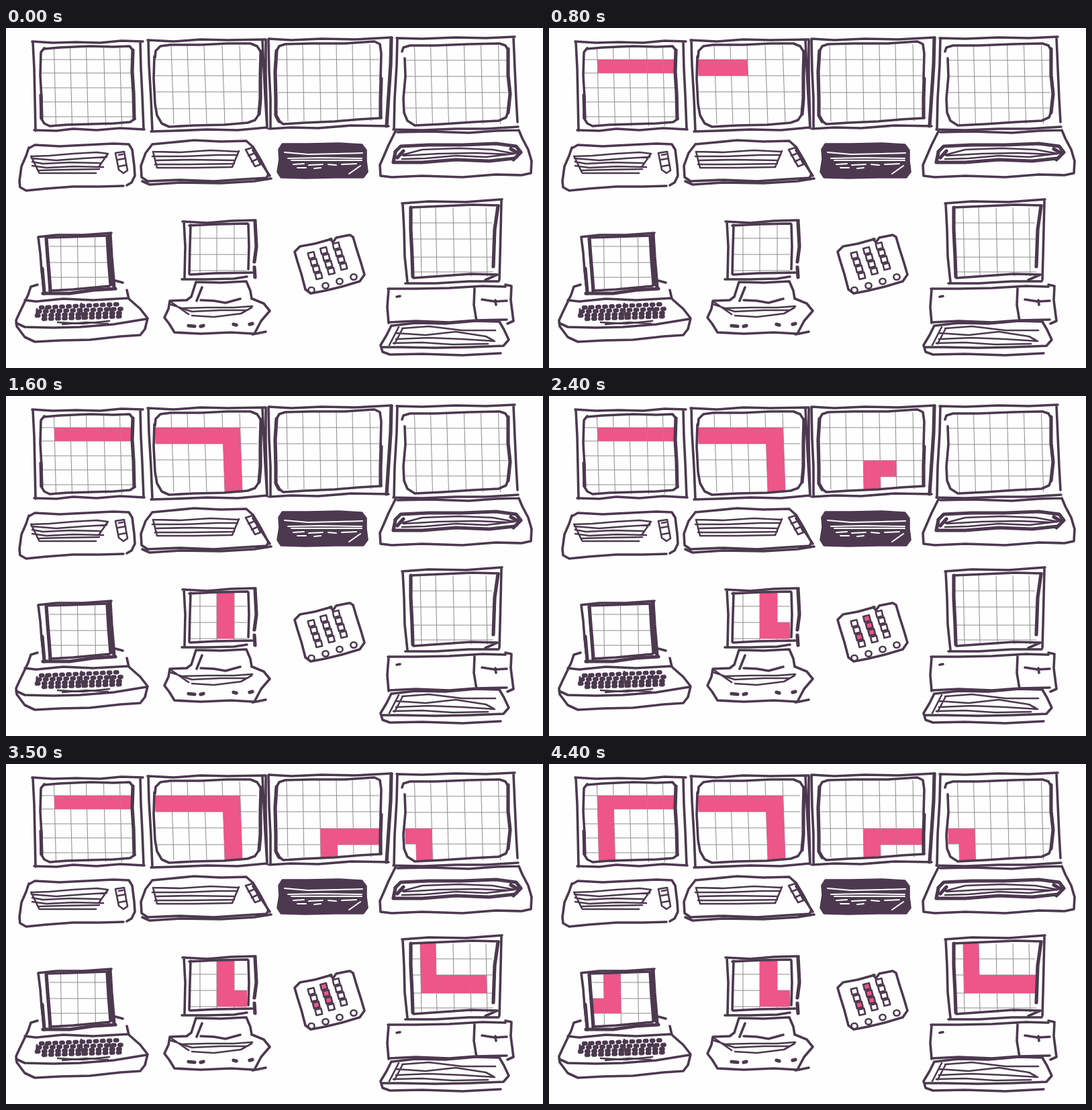
Recreate the animation shown at these times as an HTML page. Size 800 by 506 pixels, loop 4500 ms.

```html
<!DOCTYPE html>
<html lang="en">
<head>
<meta charset="utf-8">
<title>Snake across screens</title>
<style>
html, body { margin: 0; height: 100%; overflow: hidden; background: #fefefe; }
svg { display: block; width: 100vw; height: 100vh; }
#grid { stroke: #8c8c8c; stroke-width: 1; fill: none; }
#snake { fill: #ee5588; }
#ink { fill: none; stroke: #4c394f; stroke-width: 3.6; stroke-linecap: round; stroke-linejoin: round; }
#ink .thin { stroke-width: 2.6; }
#ink .bold { stroke-width: 5.2; }
#ink .keys { stroke-width: 6.4; stroke-dasharray: 2.5 7.6; }
#ink .solid { fill: #4c394f; }
#ink .white { stroke: #fefefe; stroke-width: 2; }
</style>
</head>
<body>
<svg viewBox="0 0 800 506">
<g id="grid"></g>
<g id="snake"></g>
<g id="ink">
  <!-- top row: monitors -->
  <path d="M39 20L70 22 104 21 140 22 172 19 204 20M40 21L42 60 43 105 44 153M42 152L75 153 100 150 135 152 170 149 206 151M200 21L201 60 203 100 205 150"/>
  <path d="M57 31L80 29 125 27 160 28 184 27 189 33M52 37L51 70 53 105 52 134 57 142 65 146 90 144 125 143 160 142 185 140 192 135M57 30L52 36"/>
  <path class="bold" d="M189 33L188 65 190 96 191 135M52 100L53 134"/>
  <path d="M211 18L250 20 290 17 330 18 387 17M212 18L213 55 216 105 218 153M216 154L250 153 300 151 345 152 389 148M382 18L384 60 386 100 389 149M387 18L387 70 389 148"/>
  <path d="M222 44L223 34 230 27 245 25 290 25 330 23 364 23 374 27 380 36M221 42L220 75 222 113 225 130 232 142 243 147 280 145 325 144 360 141 371 137 377 128"/>
  <path class="bold" d="M380 35L379 70 379 105 377 128"/>
  <path d="M391 16L425 18 470 16 520 17 575 14M391 17L392 65 394 105 394 149M392 150L425 148 465 149 515 145 570 146"/>
  <path class="bold" d="M574 15L573 55 570 100 567 146"/>
  <path d="M403 34L407 27 416 24 455 23 505 23 549 20 557 24 559 38 558 75M405 137L413 143 445 141 490 139 525 136 559 134"/>
  <path class="bold" d="M403 34L401 65 402 105 402 130 407 139M559 75L558 105 558 133"/>
  <path d="M582 15L620 16 670 14 715 15 758 13M583 15L582 55 579 105 578 151M577 151L620 152 670 150 715 150 763 147M756 14L758 60 760 105 762 140"/>
  <path d="M590 35L592 29 602 26 640 26 690 24 735 23 744 26 748 33M594 45L595 72 592 105 593 126 598 138 609 145 650 143 695 140 734 138 745 133 748 125"/>
  <path class="bold" d="M748 31L748 70 751 98 748 126"/>

  <!-- top row: keyboards -->
  <path d="M34 179L43 174 80 176 120 174 160 172 183 173 188 181 191 205 192 220 187 230 180 234M175 235L140 236 100 236 60 239 30 242 21 237 20 228 23 206 30 190 34 178"/>
  <path class="thin" d="M37 191L65 190 100 187 135 185 152 187 146 194M38 194L75 197 115 194 150 192M39 199L55 202 95 200 140 201M39 205L60 208 100 206 145 207M48 212L80 211 139 210M50 216L85 216 134 216M38 192L49 215M152 187L138 207"/>
  <path class="thin" d="M163 186L176 184 181 212 175 216 168 211 163 186M167 196L178 194M168 206L179 204M168 189L174 188"/>
  <path d="M218 173L250 170 280 167 320 169 358 168 368 177 380 197 391 218 388 223M218 173L208 186 201 205 202 222 211 228 260 226 310 228 355 225 389 223M203 228L214 233 260 230 320 231 370 228 395 224M368 182L393 220"/>
  <path class="thin" d="M219 184L260 185 305 182 346 184M218 191L265 191 315 189 345 189M222 197L275 196 341 197M222 203L270 203 340 202M226 208L280 208 336 207M219 184L225 208M347 183L337 207"/>
  <path class="thin" d="M357 181L367 178 379 203 371 206 357 181M361 190L371 186M366 199L376 194"/>
  <path class="solid" d="M412 173L450 173 495 172 530 174 536 182 536 198 538 214 532 222 490 222 445 223 410 222 405 214 408 195 407 181Z"/>
  <path class="white" d="M415 185L450 188 495 187 531 186M420 194L470 193 530 194M425 197L530 197M428 203L444 202M451 204L472 203M480 203L492 204M500 203L522 202M434 208L447 208M459 209L469 208M511 217L528 205"/>
  <path d="M580 154L570 174 557 204 558 220 575 222 620 220 680 222 730 218 767 219M764 152L769 164 778 181 783 198 782 216 768 219M583 155L630 154 690 156 730 153 764 152"/>
  <path class="bold" d="M580 184L588 176 630 174 680 174 730 172 760 176 767 185 756 196M580 185L577 200 620 200 670 196 720 198 757 194M583 193L592 183M752 180L764 187"/>
  <path class="thin" d="M590 189L620 181 675 179 725 181 758 187 715 192 670 190 625 194 590 195M592 190L645 187 700 186 748 188"/>

  <!-- bottom row: first computer -->
  <path d="M48 311L75 308 115 308 157 305M48 311L51 335 53 361 57 396"/>
  <path class="bold" d="M60 313L62 340 64 364 66 391M155 307L157 340 161 386M151 310L153 345 156 382M54 358L57 393M55 395L95 395 130 390 163 388"/>
  <path d="M60 312L95 311 152 309M65 391L100 389 154 384"/>
  <path d="M47 382L37 385 33 397 20 424 15 435 16 444 28 460 43 467 80 465 125 464 170 459 200 457 207 448 211 432 200 418 183 403 180 390M163 376L174 379M28 405L45 407 85 403 130 405 183 402M15 439L28 445 70 446 110 445 160 441 209 433"/>
  <path class="keys" d="M52 416L170 411M48 422L173 418M46 428L174 424M56 433L176 429"/>
  <path class="thin" d="M46 418L45 430M60 414L55 434M112 410L114 433M153 410L158 431M77 438L115 440 154 436M84 441L120 438 152 440"/>

  <!-- bottom row: second computer -->
  <path d="M263 288L300 290 335 287 372 286M265 288L267 325 266 372M262 374L300 374 340 373 359 370"/>
  <path class="bold" d="M371 288L373 325 370 348M370 356L371 371"/>
  <path d="M273 294L315 292 360 291M275 293L274 325 273 366M361 292L362 325 361 359M274 367L310 365 367 364"/>
  <path d="M283 378L276 400 269 405M283 378L320 379 358 377 364 391 366 403M292 386L284 406M290 405L310 406 327 409 349 403M270 405L244 406 242 418 236 431 243 440 251 453 290 455 335 453 370 455 380 436 393 421 384 410 367 403M367 456L387 452"/>
  <path class="thin" d="M244 411L262 417 300 416 340 416 367 414M264 418L277 422 320 420 357 420M277 428L310 430 350 425 366 416M246 408L272 426"/>
  <path class="bold" d="M272 443L281 444M290 444L294 443M339 441L343 442M363 441L367 440"/>

  <!-- bottom row: calculator -->
  <path d="M430 333L438 325 460 321 485 314M483 314L487 319 492 312 512 308 517 311 522 328 529 350 534 367 527 377 500 385 475 391 454 395 446 389 440 366 434 347 430 333"/>
  <g id="pad" class="thin"></g>

  <!-- bottom row: third computer -->
  <path d="M590 261L630 258 685 259 739 255M591 261L593 300 594 340 598 378M595 380L640 380 690 377 734 377M738 257L737 300 736 340 735 375"/>
  <path d="M603 267L650 265 695 263 734 264M607 372L650 369 692 366 732 367M714 375L732 367"/>
  <path class="bold" d="M603 267L603 300 605 340 606 370M733 265L728 300 726 355"/>
  <path d="M569 388L610 388 660 387 710 384 744 385M744 382L753 384 752 405 756 436 747 440M570 389L568 415 570 439M571 438L610 436 660 438 700 435 746 434M698 388L697 412 701 436M709 404L728 407 746 406M729 405L730 412M582 400L587 399"/>
  <path d="M574 443L567 457 558 472 561 482 572 486 620 485 680 487 737 484M575 443L610 439 655 440 700 436 735 437 742 449 749 464 741 473 690 475 640 476 590 475 559 475"/>
  <path class="thin" d="M585 445L571 472M590 447L630 444 680 450 729 450M581 454L625 457 670 452 715 459 726 465M581 463L630 461 680 463 728 466M577 469L620 468 665 471 718 470M591 447L579 470"/>
</g>
</svg>
<script>
const STEP = 100, LOOP = 4500;
const byId = id => document.getElementById(id);

function add(parent, tag, attrs) {
  const el = document.createElementNS("http://www.w3.org/2000/svg", tag);
  for (const name in attrs) el.setAttribute(name, attrs[name]);
  return byId(parent).appendChild(el);
}

// Grid edges of each screen; lean is the sideways drift from top to bottom.
const screens = {
  a: { x: [53, 73, 97, 121, 147, 171, 188], y: [29, 47, 67, 89, 110, 132, 146], lean: 3 },
  b: { x: [223, 248, 272, 297, 324, 350, 375], y: [26, 47, 71, 95, 120, 143], lean: 4 },
  c: { x: [405, 419, 443, 468, 493, 517, 543, 557], y: [24, 47, 71, 96, 120, 139], lean: 2 },
  d: { x: [594, 610, 634, 658, 684, 709, 735, 747], y: [26, 48, 72, 96, 119, 143], lean: 3 },
  e: { x: [65, 82, 107, 133, 152], y: [312, 325, 349, 371, 390], lean: 1 },
  f: { x: [275, 289, 314, 340, 359], y: [293, 313, 337, 361, 366], lean: 0 },
  h: { x: [605, 618, 641, 667, 692, 716, 725], y: [267, 290, 314, 341, 363, 370], lean: 2 }
};

function corner(s, col, row) {
  const top = s.y[0], height = s.y.at(-1) - top;
  return (s.x[col] + s.lean * ((s.y[row] - top) / height - 0.5)).toFixed(1) + " " + s.y[row];
}

for (const s of Object.values(screens)) {
  const right = s.x.length - 1, bottom = s.y.length - 1;
  let d = "";
  for (let i = 1; i < right; i++) d += `M${corner(s, i, 0)}L${corner(s, i, bottom)}`;
  for (let j = 1; j < bottom; j++) d += `M${corner(s, 0, j)}L${corner(s, right, j)}`;
  add("grid", "path", { d });
}

// Calculator keys, three tilted columns and a bottom row.
const key = (col, row) => [455 + 18.5 * col + 3.6 * row, 338 - 7 * col + 10.2 * row];
for (let col = 0; col < 3; col++)
  for (let row = 0; row < 4; row++) {
    const [x, y] = key(col, row);
    add("pad", "rect", { x: x - 4.5, y: y - 4, width: 9, height: 8.5, transform: `rotate(-14 ${x} ${y})` });
  }
for (let i = 0; i < 4; i++)
  add("pad", "ellipse", { cx: 455 + 21 * i, cy: 390 - 6.5 * i, rx: 4.6, ry: 4.2 });

// The snake's route: screen letter, then column and row of every cell.
const route = "a 11 21 31 41 51,b 01 11 21 31 41 42 43 44,f 20 21 22 32,g 02 12 11 10," +
  "c 34 33 43 53 63,d 03 13 14,h 10 11 12 22 32 42 52,e 02 12 11 10,a 15 14 13 12";

const cells = route.split(",").flatMap(run => {
  const [name, ...steps] = run.split(" ");
  return steps.map(([c, r]) => {
    const col = +c, row = +r, s = screens[name];
    if (!s) {
      const [cx, cy] = key(col, row);
      return add("snake", "circle", { cx, cy, r: 4.6 });
    }
    const points = [[0, 0], [1, 0], [1, 1], [0, 1]].map(([i, j]) => corner(s, col + i, row + j));
    return add("snake", "polygon", { points: points.join(" ") });
  });
});

const start = performance.now();
function draw() {
  const length = Math.floor((performance.now() - start) % LOOP / STEP);
  cells.forEach((cell, i) => cell.setAttribute("visibility", i < length ? "visible" : "hidden"));
  requestAnimationFrame(draw);
}
draw();
</script>
</body>
</html>
```
